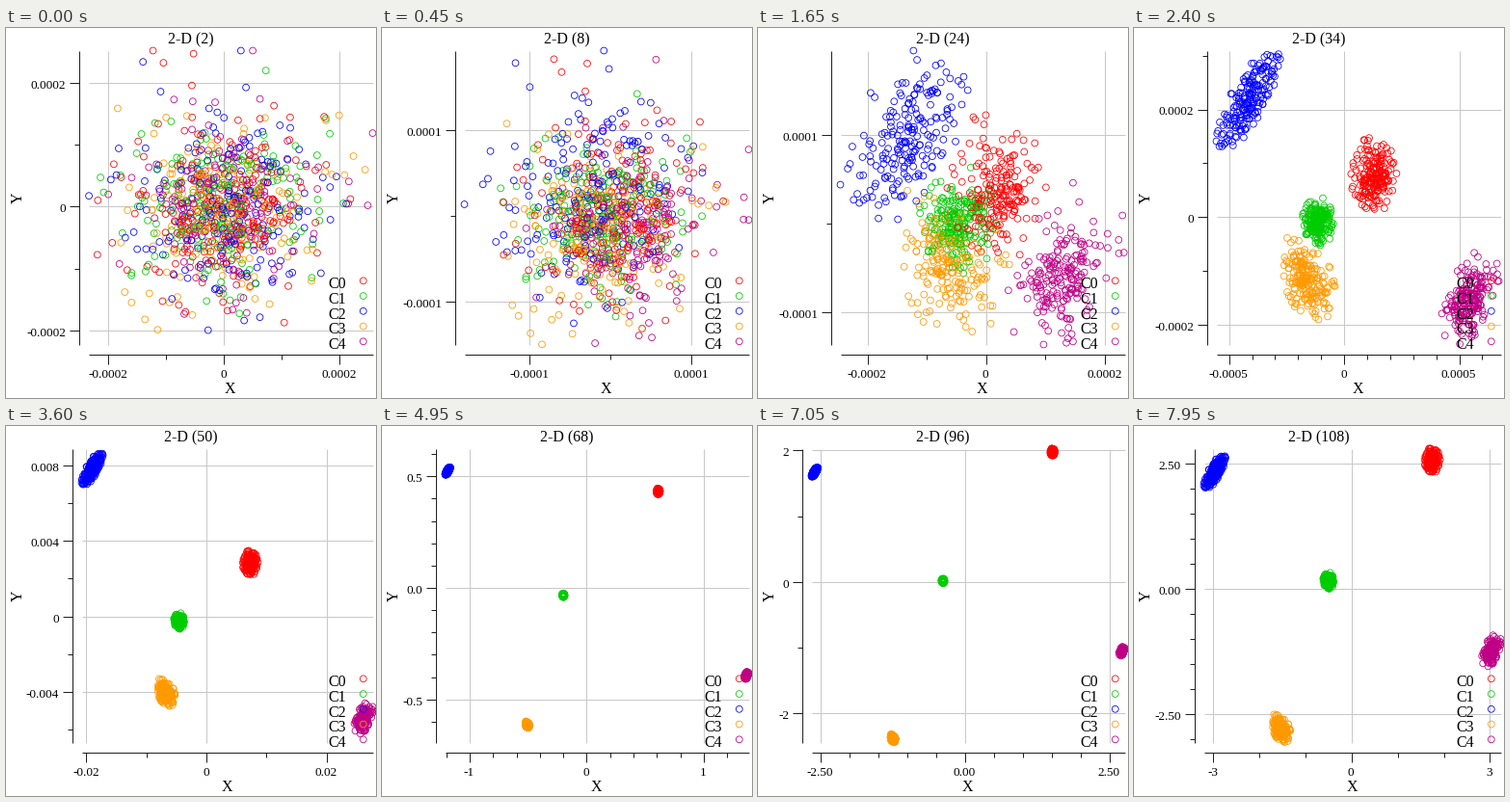
Animation of 384 by 384 pixels, one loop 8 s. Source, as a matplotlib script:

```python
import math

import matplotlib.pyplot as plt
import numpy as np
from matplotlib.animation import FuncAnimation
from matplotlib.collections import LineCollection

SIZE, DPI = 384, 96
PX = 72 / DPI
TOP, BOTTOM, RIGHT, BASE = 23, 328, 380, 338
PER_CLASS = 200
SMALL = 13.3

# Axis range at a few steps: step, x low, x high, y low, y high
RANGES = [
    (0, -2.35e-4, 2.57e-4, -2.23e-4, 2.52e-4),
    (7, -1.28e-4, 9.93e-5, -8.87e-5, 1.36e-4),
    (16, -5.55e-4, 6.8e-4, -2.36e-4, 3.09e-4),
    (24, -.0208, .0277, -.0067, .0089),
    (33, -1.21, 1.384, -.693, .624),
    (41, -2.20, 2.36, -1.94, 1.47),
    (53, -3.20, 3.23, -3.07, 2.80),
]

# Colour, early and late centre as fractions of the plot box, size, tilt
CLASSES = [
    ("#ff0000", (.58, .39), (.77, .01), .8, 0),
    ("#00cd00", (.335, .587), (.42, .45), .55, .1),
    ("#0000ff", (0, .07), (0, .08), 1.15, -.8),
    ("#ff9900", (.29, .83), (.26, 1), .95, .4),
    ("#bf0086", (1, .92), (1, .69), 1, -.4),
]
COLORS = [c[0] for c in CLASSES]

rng = np.random.default_rng(12)
noise = rng.standard_t(8, size=(len(CLASSES), PER_CLASS, 2))
order = rng.permutation(len(CLASSES) * PER_CLASS)
point_colors = np.repeat(COLORS, PER_CLASS)[order]


def axis_range(step):
    """Both ends of each axis grow geometrically between the given steps."""
    keys, *ends = np.array(RANGES).T
    return [np.sign(e[0]) * math.exp(np.interp(step, keys, np.log(abs(e)))) for e in ends]


def nice_ticks(lo, hi):
    """Find the round spacing that covers the range best with 2 to 4 labels."""
    span = hi - lo
    power = math.floor(math.log10(span))
    best = (-9,)
    for exponent in (power - 1, power):
        for mantissa in (1, 2, 2.5, 3, 4, 5):
            step = mantissa * 10.0 ** exponent
            for shift in (0, .25, .5, .75):
                first = math.ceil(lo / step - shift)
                last = math.floor(hi / step - shift)
                if not 2 <= last - first + 1 <= 4:
                    continue
                odd = mantissa == 2 and shift == .5
                cost = 0 if shift == 0 else .005 if odd else .3
                score = ((last - first) * step / span - cost
                         - .05 * abs(span / step - 2.3))
                if score > best[0] + 1e-9:
                    majors = [(k + shift) * step for k in range(first, last + 1)]
                    best = (score, step, mantissa, shift, majors)
    _, step, mantissa, shift, majors = best
    parts = {1: 2 if shift else 5, 2.5: 5, 3: 3, 5: 5}.get(mantissa, 2)
    gap = step / parts
    ks = range(math.ceil((lo - majors[0]) / gap), math.floor((hi - majors[0]) / gap) + 1)
    minors = [majors[0] + k * gap for k in ks if k % parts]
    return step, majors, minors


def label(value, step):
    value = round(value, 12) + 0.0
    if step < .1:
        return f"{value:g}"
    digits = 2 if step == 2.5 else len(f"{step:g}".partition(".")[2])
    return f"{value:.{digits}f}"


def text_width(text):
    return SMALL * sum({"-": .333, ".": .25, "e": .444}.get(c, .5) for c in text)


def cloud(step, corner, size, origin):
    """Classes leave the origin, tighten, and always stay inside the plot box."""
    spread = 42 * math.exp(-(step / 14) ** 1.6) + .2 + 4 * max(0, (step - 41) / 12) ** 2
    split = min(1, step / 16)
    leave = min(1, step / 20)
    late = np.interp(step, [24, 38], [0, 1])
    reach = 5 - 2.4 * split
    parts = []
    for (_, start, end, scale, tilt), z in zip(CLASSES, noise):
        radius = np.hypot(z[:, 0], z[:, 1]) / reach
        z = z / ((1 + radius ** 4) ** .25)[:, None]
        rho = tilt * split
        shape = np.column_stack([z[:, 0], rho * z[:, 0] + math.sqrt(1 - rho ** 2) * z[:, 1]])
        sigma = spread * (1 + (scale - 1) * split) * np.array([1, 1 + .6 * split])
        goal = corner + size * ((1 - late) * np.array(start) + late * np.array(end))
        center = origin + leave * (goal - origin)
        inset = 2.3 * sigma
        center = np.clip(center, corner + inset, corner + size - inset)
        parts.append(center + sigma * shape)
    return np.clip(np.concatenate(parts)[order], corner, corner + size) + .5


fig = plt.figure(figsize=(SIZE / DPI, SIZE / DPI), dpi=DPI, facecolor="white")
ax = fig.add_axes([0, 0, 1, 1])


def write(x, y, text, size=16, ha="center", va="baseline", **kw):
    ax.text(x, y, text, fontsize=size * PX, family="Liberation Serif",
            ha=ha, va=va, color="black", zorder=5, **kw)


def lines(segments, color, zorder):
    snapped = np.floor(np.array(segments, float)) + .5
    ax.add_collection(LineCollection(snapped, colors=color, linewidths=PX, zorder=zorder))


def rings(points, colors):
    ax.scatter(points[:, 0], points[:, 1], s=(6.8 * PX) ** 2, facecolors="none",
               edgecolors=colors, linewidths=.8 * PX, zorder=3)


def draw(frame):
    step = frame // 3
    ax.clear()
    ax.set(xlim=(0, SIZE), ylim=(SIZE, 0))
    ax.set_axis_off()

    x_lo, x_hi, y_lo, y_hi = axis_range(step)
    x_step, x_major, x_minor = nice_ticks(x_lo, x_hi)
    y_step, y_major, y_minor = nice_ticks(y_lo, y_hi)
    y_labels = [label(v, y_step) for v in y_major]
    axis = int(34.5 + max(map(text_width, y_labels)))
    left = axis + 10

    def to_x(v):
        return left + (v - x_lo) / (x_hi - x_lo) * (RIGHT - left)

    def to_y(v):
        return BOTTOM - (v - y_lo) / (y_hi - y_lo) * (BOTTOM - TOP)

    grid = [[(to_x(v), TOP), (to_x(v), BOTTOM)] for v in x_major]
    grid += [[(left, to_y(v)), (RIGHT, to_y(v))] for v in y_major]
    lines(grid, "#c8c8c8", 1)

    rulers = [[(axis, TOP), (axis, BOTTOM)], [(left, BASE), (RIGHT, BASE)]]
    for values, length in ((x_major, 10), (x_minor, 5)):
        rulers += [[(to_x(v), BASE), (to_x(v), BASE + length)] for v in values]
    for values, length in ((y_major, 10), (y_minor, 5)):
        rulers += [[(axis - length, to_y(v)), (axis, to_y(v))] for v in values]
    lines(rulers, "#202020", 2)

    corner = np.array([left, TOP])
    size = np.array([RIGHT - left, BOTTOM - TOP])
    rings(cloud(step, corner, size, np.array([to_x(0), to_y(0)])), point_colors)

    for v in x_major:
        write(to_x(v), 363, label(v, x_step), SMALL)
    for v, text in zip(y_major, y_labels):
        write(axis - 13, to_y(v) + 6.5, text, SMALL, "right")
    write(192, 16, f"2-D ({2 + 2 * step})")
    write((left + RIGHT) / 2, 379, "X")
    write(21, 176.5, "Y", ha="right", va="center", rotation=90)

    rows = np.arange(len(CLASSES)) * 15.75
    for i, dy in enumerate(rows):
        write(353, 270 + dy, f"C{i}", ha="right")
    rings(np.column_stack([np.full(len(rows), 370.8), 262.3 + rows]), COLORS)


anim = FuncAnimation(fig, draw, frames=160, interval=50, repeat=True,
                     repeat_delay=0, init_func=lambda: None)
plt.show()
```
